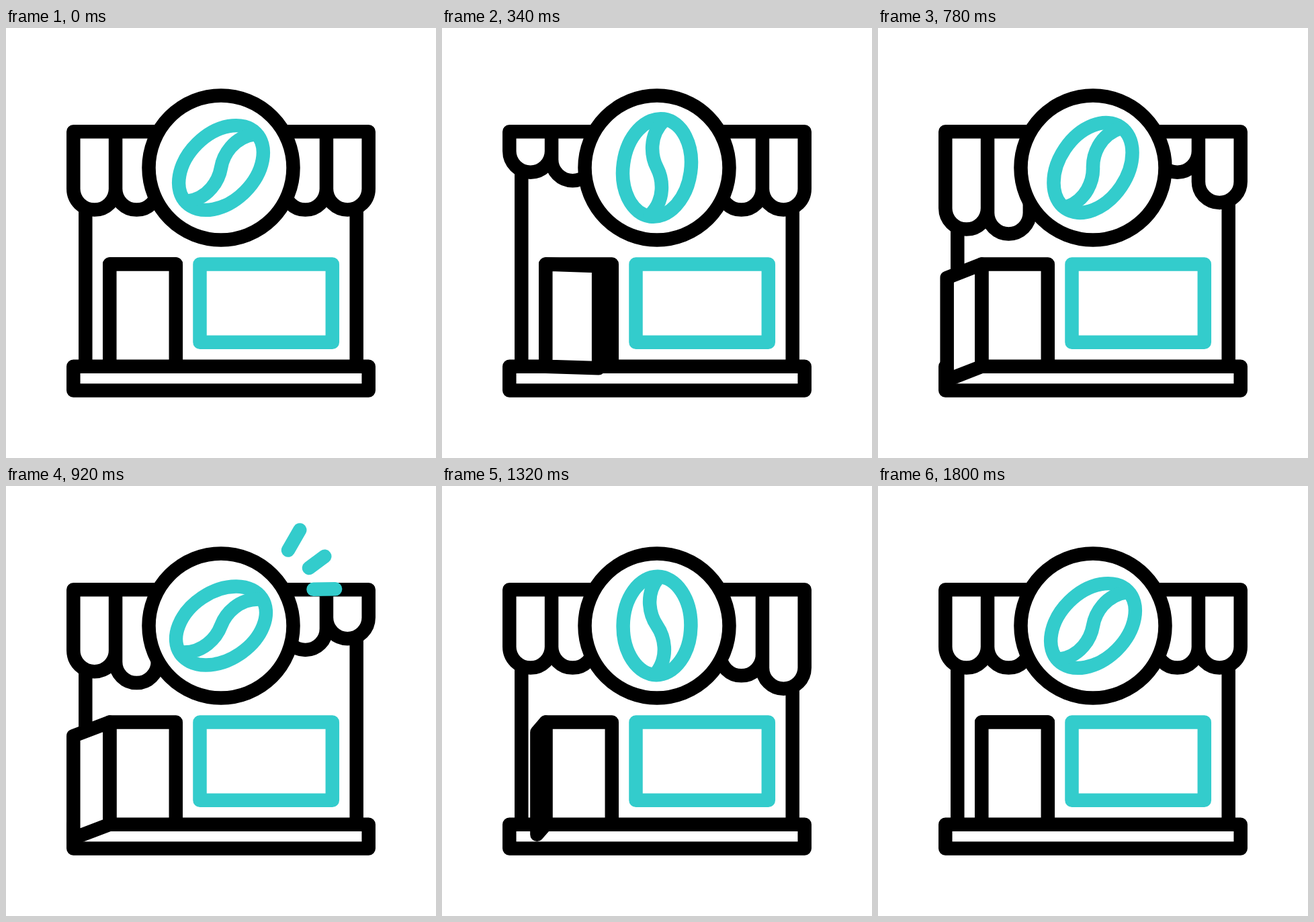
Animation, 640 px wide and 640 px high, one loop 2.4 s. Source, as an HTML page:

```html
<!DOCTYPE html>
<html lang="en">
<head>
<meta charset="utf-8">
<title>Coffee shop</title>
<style>
  html, body { margin: 0; width: 100%; height: 100%; overflow: hidden; background: #fff; }
  svg { display: block; width: 100%; height: 100%; }
  .ink, .teal { fill: none; stroke: #000; stroke-width: 20.5; stroke-linejoin: round; }
  .teal { stroke: #33cccc; stroke-linecap: round; }
  .solid { fill: #fff; }
</style>
</head>
<body>
<svg viewBox="0 0 640 640">
  <path class="ink" d="M100.3 503.7H539.7V539.6H100.3Z"/>
  <path class="ink" id="walls"/>
  <path class="ink" id="awning"/>
  <path class="ink" d="M154.3 503.7V351.5H252.8V503.7"/>
  <path class="ink solid" id="leaf"/>
  <path class="teal" d="M288.5 351.5H485.8V467.7H288.5Z"/>
  <circle class="ink solid" cx="320" cy="208" r="107.5"/>
  <g id="bean">
    <ellipse class="teal" cx="320" cy="208" rx="50.4" ry="73.2" transform="rotate(45 320 208)"/>
    <path class="teal" d="M371 158C338 162 323 190 320 208S302 254 269 258"/>
  </g>
  <path class="teal" id="rays"/>
</svg>
<script>
const LOOP = 2400, STEP = 20;
const LEFT = 100.3, TOP = 154.3, FLAP = 439.4 / 7;
const el = id => document.getElementById(id);
const clamp = x => Math.min(1, Math.max(0, x));
const mix = (a, b, p) => a + (b - a) * p;
const sine = x => (1 - Math.cos(Math.PI * x)) / 2;

// Slow start, quick middle, long soft end.
function swing(x) {
  let lo = 0, hi = 1;
  for (let i = 0; i < 24; i++) {
    const s = (lo + hi) / 2, r = 1 - s;
    const at = 3 * r * r * s * 0.82 + 3 * r * s * s * 0.22 + s * s * s;
    if (at < x) lo = s; else hi = s;
  }
  return lo * lo * (3 - 2 * lo);
}

// keys: [time, value] pairs
function track(t, keys, ease = sine) {
  let value = keys[0][1];
  for (let i = 1; i < keys.length; i++) {
    const [t0, v0] = keys[i - 1], [t1, v1] = keys[i];
    if (t >= t0) value = mix(v0, v1, ease(clamp((t - t0) / (t1 - t0))));
  }
  return value;
}

const flapKeys = [[0, 0], [350, -56], [690, 36], [1000, 0]];
const beanKeys = [[0, 0], [560, -55.6], [920, 11], [1320, -44], [1800, 0]];
const doorKeys = [[0, 0], [920, 1], [1800, 0]];
const flaps = [[0, 0], [1, 100], [5, 440], [6, 680]]; // column, delay
const rays = [
  [420, 95.5, 443, 55.5],
  [451, 122, 482, 99],
  [457.5, 153.8, 501, 153.2]
];

function flapPath(column, drop) {
  const x = LEFT + column * FLAP, y = 239.2 + drop, r = FLAP / 2;
  return `M${x} ${TOP}V${y}a${r} ${r} 0 0 0 ${FLAP} 0V${TOP}`;
}

function draw(t) {
  const drops = flaps.map(([, delay]) => track(t - delay, flapKeys));
  el("awning").setAttribute("d",
    `M${LEFT} ${TOP}H539.7Z` + flaps.map(([c], i) => flapPath(c, drops[i])).join(""));
  el("walls").setAttribute("d",
    `M118.3 503.7V${268 + drops[0]}M521.7 503.7V${268 + drops[3]}`);

  const open = track(t, doorKeys, swing);
  const x = mix(252.8, 100.3, open), dy = 20.5 * open;
  el("leaf").setAttribute("d",
    `M154.3 351.5L${x} ${351.5 + dy}V${503.7 + dy}L154.3 503.7Z`);

  el("bean").setAttribute("transform", `rotate(${track(t, beanKeys)} 320 208)`);

  const head = sine(clamp((t - 820) / 150)), tail = sine(clamp((t - 930) / 150));
  el("rays").setAttribute("d", head > tail ? rays.map(([x0, y0, x1, y1]) =>
    `M${mix(x0, x1, tail)} ${mix(y0, y1, tail)}L${mix(x0, x1, head)} ${mix(y0, y1, head)}`).join("") : "");
}

const start = performance.now();
function tick() {
  const t = (performance.now() - start) % LOOP;
  draw(Math.floor(t / STEP) * STEP);
  requestAnimationFrame(tick);
}
tick();
</script>
</body>
</html>
```
